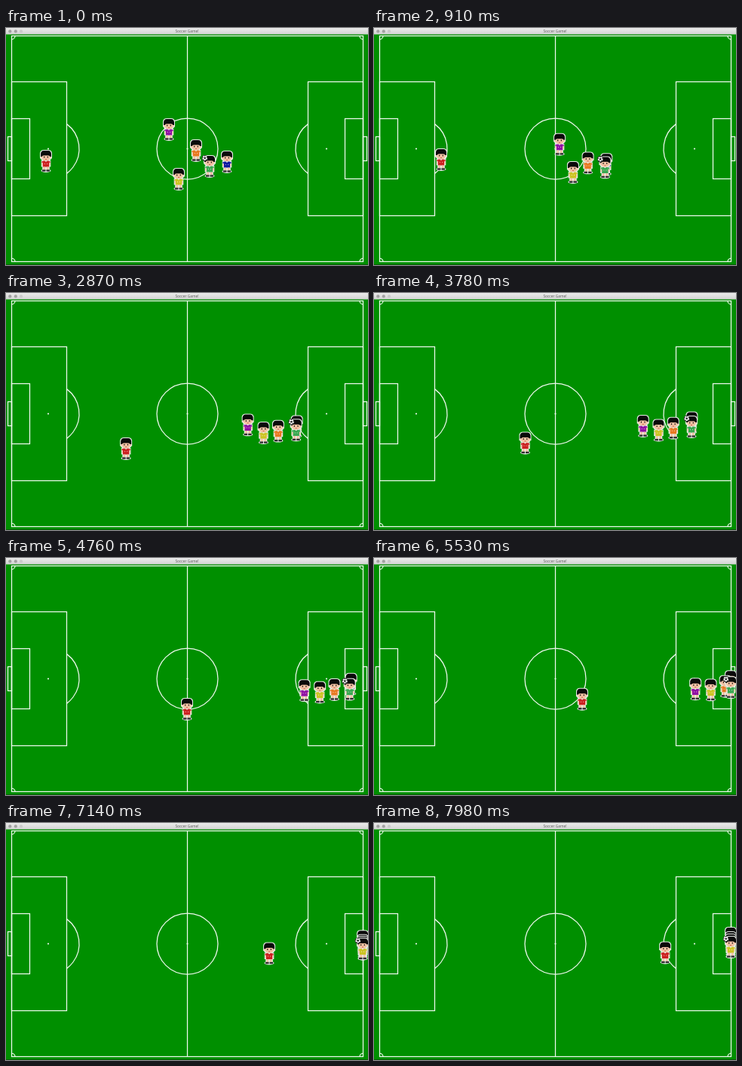
An HTML page with a canvas for the animation above (8 s loop, 480 by 315 pixels).

```html
<!DOCTYPE html>
<html lang="en">
<head>
<meta charset="utf-8">
<title>Soccer Game!</title>
<style>
html, body { margin: 0; width: 100%; height: 100%; overflow: hidden; background: #008f00; }
canvas { display: block; width: 480px; height: 315px; }
</style>
</head>
<body>
<canvas id="stage"></canvas>
<script>
const W = 480, H = 315, LOOP = 8000, STEP = 70;
const SPEED = 0.0397; // px per ms
const WALL = 473;
const MID_Y = 160.5;
const LINE = '#eef8ee';
const canvas = document.getElementById('stage');
const ctx = canvas.getContext('2d');
const dpr = window.devicePixelRatio || 1;
canvas.width = W * dpr;
canvas.height = H * dpr;
ctx.scale(dpr, dpr);

// Key points: time, x, y
const carrierPath = [[0, 270, 169], [1900, 346, 172], [3780, 421, 163], [5250, WALL, 158], [LOOP, WALL, 150]];
const keeperPath = [[0, 53, 162], [910, 89, 160], [2030, 121, 199], [3780, 200.5, 184.5], [4760, 240, 186], [6300, 312, 159.5], [LOOP, 387, 157.5]];

// Chasers run straight at the carrier; lift spreads the pile-up at the goal.
const blue = { shirt: '#1018a0', start: [293, 163], offset: [2, -4], lift: 8 };
const orange = { shirt: '#e87820', start: [252, 148], offset: [0, 0], lift: 6 };
const purple = { shirt: '#9010a4', start: [216, 120], offset: [0, 0], lift: 3 };
const yellow = { shirt: '#ccc422', start: [229, 186], offset: [0, 0], lift: 0 };

function locate(path, t) {
  let i = 1;
  while (i < path.length - 1 && path[i][0] < t) i++;
  const [t0, x0, y0] = path[i - 1], [t1, x1, y1] = path[i];
  const k = (t - t0) / (t1 - t0);
  return [x0 + (x1 - x0) * k, y0 + (y1 - y0) * k];
}

function chase({ start, offset, lift }, until) {
  let [x, y] = start;
  for (let t = STEP; t <= until; t += STEP) {
    const [cx, cy] = locate(carrierPath, t);
    const dx = Math.min(WALL, cx + offset[0]) - x;
    const dy = cy + offset[1] - lift * (t / LOOP) ** 2 - y;
    const k = Math.min(1, SPEED * STEP / (Math.hypot(dx, dy) || 1));
    x += dx * k;
    y += dy * k;
  }
  return [x, y];
}

function box(x, y, w, h, color) {
  ctx.fillStyle = color;
  ctx.fillRect(x, y, w, h);
}

function oval(x, y, rx, ry, color) {
  ctx.fillStyle = color;
  ctx.beginPath();
  ctx.ellipse(x, y, rx, ry, 0, 0, 7);
  ctx.fill();
}

function arc(x, y, r, from, to) {
  ctx.beginPath();
  ctx.arc(x, y, r, from, to);
  ctx.stroke();
}

function area(x0, x1, half) {
  ctx.strokeRect(x0, MID_Y - half, x1 - x0, half * 2);
}

function drawHalf() {
  area(7.5, 80.5, 89);
  area(7.5, 31.5, 40);
  area(2.5, 7.5, 16);
  const open = Math.acos(24.5 / 41);
  arc(56, MID_Y, 41, -open, open);
  oval(56, MID_Y, 1.1, 1.1, LINE);
  arc(7.5, 10.5, 4.5, 0, Math.PI / 2);
  arc(7.5, 310.5, 4.5, -Math.PI / 2, 0);
}

function drawPitch() {
  box(0, 0, W, H, '#008f00');
  ctx.strokeStyle = LINE;
  ctx.lineWidth = 1.25;
  area(7.5, 473.5, 150);
  box(239.9, 10.5, 1.25, 300, LINE);
  arc(240.5, MID_Y, 40.5, 0, 7);
  oval(240.5, MID_Y, 1.1, 1.1, LINE);
  drawHalf();
  ctx.save();
  ctx.translate(481, 0);
  ctx.scale(-1, 1);
  drawHalf();
  ctx.restore();
  box(0, 314, W, 1, '#0a5a0a');
}

function drawTitleBar() {
  const shade = ctx.createLinearGradient(0, 0, 0, 8.5);
  shade.addColorStop(0, '#ebebeb');
  shade.addColorStop(1, '#d2d2d2');
  box(0, 0, W, 8.5, shade);
  oval(5.3, 4.4, 2.1, 2.1, '#a2a2a2');
  oval(12.8, 4.4, 2.1, 2.1, '#a2a2a2');
  oval(20, 4.4, 2.1, 2.1, '#cacaca');
  ctx.fillStyle = '#5c5c5c';
  ctx.font = '4.9px "Open Sans", sans-serif';
  ctx.textAlign = 'center';
  ctx.textBaseline = 'middle';
  ctx.fillText('Soccer Game!', 240, 4.7);
}

function drawPair(x, y, w, h, color) {
  box(-x - w, y, w, h, color);
  box(x, y, w, h, color);
}

// Bowl-cut outline, also used enlarged as the head's pale rim
function bowl(grow, bottom, color) {
  const w = 7 + grow, top = 1 - grow;
  ctx.fillStyle = color;
  ctx.beginPath();
  ctx.moveTo(-w, bottom);
  ctx.lineTo(-w, top + 4);
  ctx.quadraticCurveTo(-w + 0.7, top, -3, top);
  ctx.lineTo(3, top);
  ctx.quadraticCurveTo(w - 0.7, top, w, top + 4);
  ctx.lineTo(w, bottom);
  ctx.fill();
}

function drawPlayer([x, y], shirt) {
  const skin = '#f3c2a4', ink = '#0a0a0a', rim = '#e8eee8';
  ctx.save();
  ctx.translate(x, y);

  // Pale rim
  bowl(1, 11.5, rim);
  oval(0, 11, 7.2, 4.2, rim);
  box(-6.3, 14, 12.6, 8.5, rim);
  box(-4.8, 22, 9.6, 5, rim);
  oval(0, 27.6, 6.5, 2.3, rim);

  // Head
  bowl(0, 9, ink);
  oval(0, 10.3, 5.6, 4, skin);
  box(-5.2, 5, 10.4, 2.4, ink);
  drawPair(5.6, 9, 1.2, 2.2, skin);
  drawPair(1.7, 8.7, 1.2, 1.7, ink);
  box(-1, 12, 2, 0.9, '#c85848');

  // Body
  box(-4.2, 14.6, 8.4, 8, shirt);
  drawPair(4.2, 15, 1.4, 2.4, shirt);
  drawPair(4.2, 17.4, 1.4, 3.4, skin);
  box(-1, 14.4, 2, 1.2, rim);
  drawPair(1, 18, 1.1, 1.1, '#ffffff90');

  // Legs and boots
  drawPair(0.8, 22.6, 2.8, 3.8, skin);
  drawPair(0.5, 26.3, 4.6, 2.4, '#303030');
  ctx.restore();
}

function drawBall(x, y) {
  oval(x, y, 3.9, 3.9, '#202020');
  oval(x, y, 3.3, 3.3, '#f4f4f4');
  oval(x, y, 1.2, 1.2, '#111');
  for (let i = 0; i < 5; i++) {
    const a = i * Math.PI * 0.4 - Math.PI / 2;
    oval(x + 3 * Math.cos(a), y + 3 * Math.sin(a), 0.8, 0.8, '#222');
  }
}

function frame(now) {
  const t = Math.floor((now % LOOP) / STEP) * STEP;
  const carrier = locate(carrierPath, t);
  drawPitch();
  drawTitleBar();
  for (const p of [blue, orange, purple]) drawPlayer(chase(p, t), p.shirt);
  drawPlayer(carrier, '#38a850');
  drawPlayer(chase(yellow, t), yellow.shirt);
  drawPlayer(locate(keeperPath, t), '#cc2020');
  drawBall(carrier[0] - 6.3, carrier[1] + 3.8);
  requestAnimationFrame(frame);
}
frame(performance.now());
</script>
</body>
</html>
```
